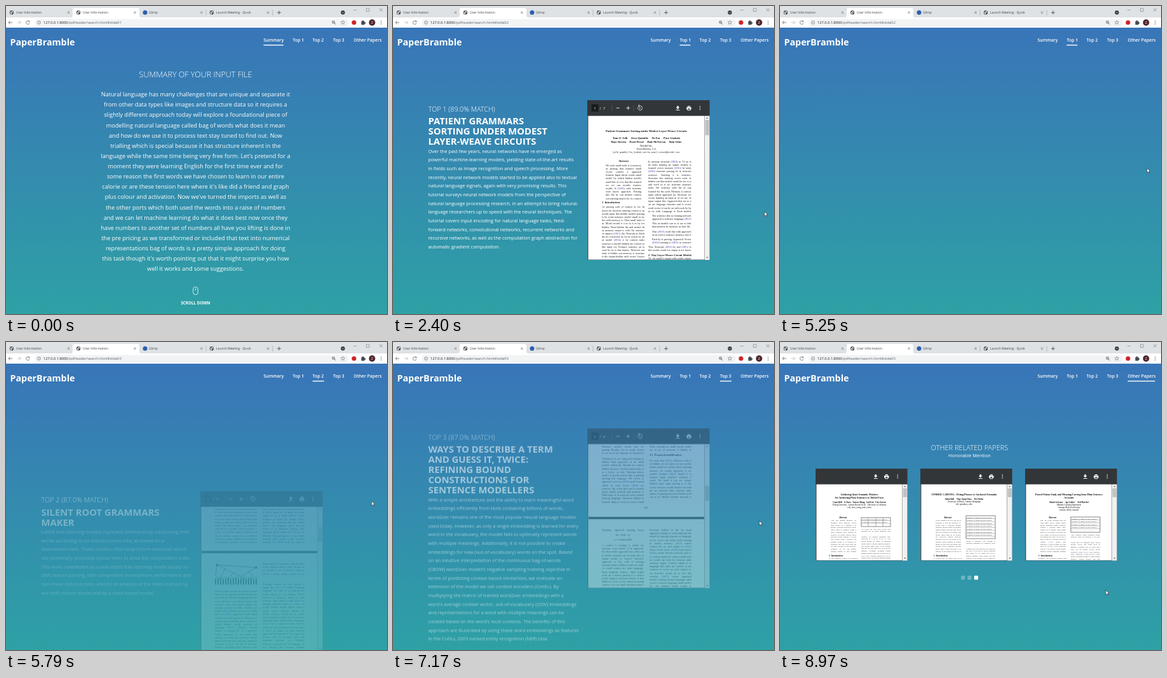
An HTML page for the animation above (9000 ms loop, 600x484 px).

```html
<!DOCTYPE html>
<html lang="en">
<head>
<meta charset="utf-8">
<title>User Information</title>
<style>
html, body { margin: 0; width: 100%; height: 100%; overflow: hidden; }
svg { display: block; width: 100%; height: 100%; font-family: "Open Sans", "Noto Sans", sans-serif; }
.light { font-weight: 300; }
.semi { font-weight: 600; }
.bold { font-weight: 700; }
.mid { text-anchor: middle; }
.serif { font-family: "Liberation Serif", serif; }
.mono { font-family: "Liberation Mono", monospace; }
.col { font-family: "Liberation Serif", serif; color: #222; text-align: justify; overflow: hidden; height: 100%; }
.col i { font-style: normal; color: #33a; }
</style>
</head>
<body>
<svg id="stage" viewBox="0 0 600 484"></svg>
<script>
const LOOP = 9000, LEAVE = 330, RISE = 450;
const stage = document.getElementById('stage');
const clamp = v => Math.max(0, Math.min(1, v));
const smooth = p => p * p * (3 - 2 * p);

const text = (x, y, size, str, cls = '', fill = '#fff') =>
  `<text x="${x}" y="${y}" font-size="${size}" class="${cls}" fill="${fill}">${str}</text>`;
const rect = (x, y, w, h, fill, more = '') =>
  `<rect x="${x}" y="${y}" width="${w}" height="${h}" fill="${fill}" ${more}/>`;
const dot = (x, y, r, fill) => `<circle cx="${x}" cy="${y}" r="${r}" fill="${fill}"/>`;
const line = (d, color, w = 0.8) => `<path d="${d}" fill="none" stroke="${color}" stroke-width="${w}"/>`;
const lines = (x, y, step, size, rows, cls) =>
  rows.map((row, i) => text(x, y + i * step, size, row, cls)).join('');
// fade: how much faster than its slide a part vanishes
const part = (delay, span, lift, body, fade = 0) =>
  `<g class="part" data-delay="${delay}" data-span="${span}" data-lift="${lift}" data-fade="${fade}">${body}</g>`;

// Filler prose for the small paper pages
let seed = 7;
const rnd = () => (seed = (seed * 16807) % 2147483647) / 2147483647;
const vocab = ('we the a of in to and for with each model models word words network small input features sentence ' +
  'training vector language results approach which tasks context that are is on structure memory is can be ' +
  'layers as it an by this learned parsing hidden output matrix').split(' ');
function prose(count) {
  let out = '', start = true;
  for (let i = 0; i < count; i++) {
    const w = vocab[Math.floor(rnd() * vocab.length)];
    out += start ? w[0].toUpperCase() + w.slice(1) : w;
    start = rnd() < 0.07;
    if (rnd() < 0.025) out += ' <i>(20' + (10 + Math.floor(rnd() * 7)) + ')</i>';
    out += start ? '. ' : ' ';
  }
  return out;
}
function column(x, y, w, h, size = 4.1, step = 5.2) {
  const count = Math.ceil(h / step) * Math.ceil(w / size / 2);
  return `<foreignObject x="${x}" y="${y}" width="${w}" height="${h}">` +
    `<div class="col" style="font-size:${size}px;line-height:${step}px">${prose(count)}</div></foreignObject>`;
}

// Browser window
function globe(x, y) {
  return dot(x, y, 3.2, '#4d5156') +
    `<path d="M${x - 2.4} ${y - 0.8}l1.8.3 1 1.2-1 1.9-1.2-1zM${x} ${y - 2.6}l1.8.8.6 1.8-1.7-.2-1.2-1z" fill="#e4e6e9"/>`;
}
const cross = (x, y, r, c) => line(`M${x - r} ${y - r}l${2 * r} ${2 * r}m0 ${-2 * r}l${-2 * r} ${2 * r}`, c, 0.7);

function chrome() {
  const grey = '#5f6368', ink = '#3c4043';
  const tab = (x, name, icon) => icon + text(x, 12.2, 5, name, '', '#45494d');
  return rect(0, 0, 600, 19, '#dfe2e4') + rect(0, 18, 600, 16, '#fff') +
    '<path d="M102 18q3 0 3-3V6q0-3 3-3h99q3 0 3 3v9q0 3 3 3z" fill="#fff"/>' +
    tab(16, 'User Information', globe(9, 10.3)) + tab(121, 'User Information', globe(114, 10.3)) +
    tab(225, 'Glimp', dot(219, 10.3, 3.5, '#2b5fae')) + tab(331, 'Launch Meeting - Quob', globe(324, 10.3)) +
    [98.5, 203, 308, 412.5].map(x => cross(x, 10.3, 1.8, grey)).join('') +
    line('M315 6v9M420 6v9', '#9a9ea4', 0.6) + line('M427 10.3h6m-3-3v6', ink) +
    dot(530.5, 10.3, 3.2, '#3c4043') + line('M529.2 9.7l1.3 1.3 1.3-1.3', '#fff', 0.6) +
    line('M547 6.5h5', '#777', 0.6) + line('M567.5 3.7h4.6v4.6h-4.6z', '#777', 0.6) + cross(590.5, 6, 2.3, '#777') +
    line('M10 26H4m2.6-2.7L3.9 26l2.7 2.7', grey) + line('M17.5 26h6m-2.6-2.7l2.7 2.7-2.7 2.7', '#b5b8bc') +
    line('M36.8 24.6a2.8 2.8 0 1 0 .1 2.5m0-4v1.8h-1.9', grey) +
    rect(45, 20.5, 495, 11.4, '#f1f3f4', 'rx="5.7"') +
    `<circle cx="52" cy="26" r="2.5" fill="none" stroke="${grey}" stroke-width=".6"/>` + line('M52 25.6v1.8M52 24.3v.6', grey, 0.6) +
    `<text x="59" y="28.1" font-size="5.7" fill="#202124">127.0.0.1:8000<tspan fill="#5f6368">/pdfreader/search.html#slide0</tspan><tspan id="hash" fill="#5f6368"></tspan></text>` +
    `<circle cx="515.7" cy="25.4" r="2" fill="none" stroke="${ink}" stroke-width=".7"/>` +
    line('M517.2 27l2 2M514.8 25.4h1.8', ink, 0.8) +
    line('M530.5 22.8l.9 2 2.2.2-1.7 1.5.5 2.1-1.9-1.1-1.9 1.1.5-2.1-1.7-1.5 2.2-.2z', grey, 0.6) +
    dot(548, 26, 3.6, '#d2232a') +
    '<path d="M559.5 24h1.6a1.1 1.1 0 1 1 2 0h1.6v1.8a1.1 1.1 0 1 1 0 2v1.7h-5.2z" fill="#45494d"/>' +
    dot(576.5, 26, 5, '#4e262b') + text(576.5, 28, 5.2, 'Z', 'mid') +
    [23.6, 26, 28.4].map(y => dot(590.8, y, 0.7, grey)).join('');
}

const NAV = [[405.5, 31.5, 'Summary'], [451.5, 17, 'Top 1'], [482.8, 18, 'Top 2'], [515, 18, 'Top 3'], [547.5, 43, 'Other Papers']];
const nav = () => text(6.5, 61.8, 14.3, 'PaperBramble', 'bold') +
  NAV.map(([x, , name]) => text(x, 56.4, 6.9, name, 'semi')).join('') +
  rect(0, 60.8, 0, 1.4, '#fff', 'id="mark"');

// PDF viewer frame
function viewer(x, y, w, h, icons, thumb, page) {
  const mid = y + 12.3, c = '#f1f1f1', right = x + w;
  const [dl, pr, more] = icons;
  return rect(x, y, w, h, '#525659') + rect(x, y, w, 24.7, '#323639') +
    rect(x + 1.5, y + 24.7, w - 9.5, h - 25.2, '#fff') + rect(right - 7.5, y + 24.7, 7.5, h - 24.7, '#f1f1f1') +
    rect(right - 6.8, y + thumb, 6, 24 * h / 251, '#c1c1c1') +
    `<path d="M${right - 5.3} ${y + 28.8}h3l-1.5-1.8zM${right - 5.3} ${y + h - 4.5}h3l-1.5 1.8z" fill="#555"/>` +
    `<path d="M${dl - 1.2} ${mid - 3.4}h2.4v2.4h1.8l-3 3-3-3h1.8zM${dl - 3} ${mid + 2.6}h6v1.1h-6z" fill="${c}"/>` +
    `<path d="M${pr - 2.2} ${mid - 3.3}h4.4v1.6h-4.4zM${pr - 3.7} ${mid - 1.2}h7.4v3.6h-1.4v1.5h-4.6v-1.5h-1.4z" fill="${c}"/>` +
    rect(pr - 1.4, mid + 0.9, 2.8, 2.1, '#323639') +
    [-2.5, 0, 2.5].map(d => dot(more, mid + d, 0.8, c)).join('') + page;
}
function bigViewer(page, pages, thumb, body) {
  const c = '#f1f1f1';
  return viewer(306, 148, 192.5, 251, [448.5, 466, 483.5], thumb, body) +
    rect(312.5, 154.5, 11, 11.3, '#191b1c') + text(318, 162.6, 6, page, 'mid', c) +
    text(325.5, 162.6, 6, '/&#160; ' + pages, '', c) +
    line('M345 155v10.5M379 155v10.5', '#666a6d', 0.6) + line('M351.5 160.3h5M367.3 160.3h6m-3-3v6', c, 0.9) +
    line('M384.8 160.5l2.4-2.4 2.4 2.4-2.4 2.4zM386.6 156.7h2.2a3.7 3.7 0 0 1 0 7.4h-1M388.2 154.9l-1.8 1.8 1.8 1.8', c, 0.8);
}
const black = (x, y, s, str, cls = 'mid serif') => text(x, y, s, str, cls, '#111');

function frontPage() {
  const head = 'mid serif bold';
  return black(399, 197.6, 4.7, 'Patient Grammars Sorting under Modest Layer-Weave Circuits', head) +
    black(399, 209.3, 4.4, 'Tam O. Velk &#160; &#160; Orra Quimble &#160; &#160; Yu Fen &#160; &#160; Pavo Lindrak', head) +
    black(399, 215, 4.4, 'Ilmo Sterrin &#160; &#160; Dorit Wexel &#160; &#160; Hale McTorven &#160; &#160; Brin Osko', head) +
    black(399, 220.5, 4.4, 'Nordal Inc.') + black(399, 226, 4.4, 'Fern Hollow, CA') +
    black(399, 231.3, 3, '{velk,quimble,fen,lindrak,sterrin,wexel,torven}@nordal.test', 'mid mono') +
    black(363, 244.5, 4.3, 'Abstract', head) + column(335, 247.5, 56, 57.2) +
    black(329, 309.7, 4.4, '1 &#160;Introduction', 'serif bold') + column(329, 313.3, 67, 84) +
    column(402, 241.7, 67.5, 83.2) + column(408, 326.5, 61.5, 10.4) + column(408, 339, 61.5, 10.4) +
    column(408, 351.5, 61.5, 10.4) + column(408, 363.5, 61.5, 10.4) + column(402, 375.5, 67.5, 10.4) +
    black(402, 392.6, 4.4, '2 &#160;Tiny Layer-Weave Circuit Models', 'serif bold') + column(402, 394, 67.5, 5);
}
function treePage() {
  let leaves = '';
  for (let i = 0; i < 17; i++) {
    const x = 330 + i * 4;
    leaves += line(`M${x} 295V${286 - i % 3}`, '#222', 1.6) + line(`M${x} 285l2-3 2 3`, '#444', 0.4);
  }
  return column(329, 174, 66, 57) + column(404, 174, 66, 57) + rect(308, 242, 182, 3.5, '#323639') +
    line('M332 264l62 4M332 264l38 18 24-14M332 264l-2 18M345 270l-6 12M358 276l-5 6M382 275l8 7', '#222', 0.6) +
    dot(332, 264, 1.6, '#333') + dot(394, 268, 1.6, '#333') +
    leaves + column(329, 303, 66, 95) + column(404, 260, 66, 20) + column(404, 292, 66, 106);
}
function matrixPage() {
  return column(329, 174, 66, 16) + column(329, 193, 66, 73) + column(404, 174, 66, 10.4) +
    black(404, 191, 4.4, '3.2 &#160;Proposed modification', 'serif bold') + column(404, 196, 66, 62) +
    black(398, 274, 3.6, '3162') + rect(308, 287, 182, 3.5, '#323639') +
    column(329, 305, 66, 6) + black(362, 317, 4.5, 'H = WX + b') + black(362, 324, 4.5, 'y = softmax(H)') +
    column(329, 329, 66, 68) + column(404, 305, 66, 92);
}

function card(i, heads, people, places) {
  const x = 56 + i * 165, c = x + 69, left = x + 21, right = x + 72, bold = 'mid serif bold';
  let y = 241.3, out = '';
  for (const h of heads) { out += black(c, y, 3.9, h, bold); y += 5; }
  y += 2;
  out += black(c, y, 3.2, people, bold);
  for (const p of places) out += black(c, y += 4, 3.1, p);
  out += black(left + 22, 277, 3.4, 'Abstract', bold) + column(left + 3, 279, 40, 51, 2.9, 3.75);
  out += black(left, 337, 3.4, '1 &#160;Introduction', 'serif bold') + column(left, 338.5, 45, 4.5, 2.9, 3.75);
  const top = [276, 273, 275][i], deep = [14, 36, 24][i];
  out += rect(right, top, 46, deep, '#fff', 'stroke="#333" stroke-width=".6"');
  for (let r = top + 4.6; r < top + deep - 1; r += 4.6)
    out += line(`M${right} ${r}h46`, '#666', 0.4) + text(right + 1.5, r - 1, 2.8, 'Example of input text and symbols', 'serif', '#222');
  if (i == 0) out += line(`M${right + 11} ${top}v14m12 -14v14m11 -14v14`, '#444', 0.4);
  const low = top + deep + 2.5;
  out += column(right, low, 46, 8, 2.9, 3.75) + column(right, low + 12, 46, 343 - low - 12, 2.9, 3.75);
  return part(60 + i * 140, 400, 13,
    viewer(x, 199, 144.5, 144.5, [x + 94.7, x + 111.8, x + 129.3], 31, out));
}

// Slides
const summary = ['Natural language has many challenges that are unique and separate it',
  'from other data types like images and structure data so it requires a',
  'slightly different approach today will explore a foundational piece of',
  'modelling natural language called bag of words what does it mean',
  'and how do we use it to process text stay tuned to find out. Now',
  'trialling which is special because it has structure inherent in the',
  "language while the same time being very free form. Let's pretend for a",
  'moment they were learning English for the first time ever and for',
  'some reason the first words we have chosen to learn in our entire',
  "calorie or are these tension here where it's like did a friend and graph",
  "plus colour and activation. Now we've turned the imports as well as",
  'the other ports which both used the words into a raise of numbers',
  'and we can let machine learning do what it does best now once they',
  'have numbers to another set of numbers all have you lifting is done in',
  'the pre pricing as we transformed or included that text into numerical',
  'representations bag of words is a pretty simple approach for doing',
  "this task though it's worth pointing out that it might surprise you how",
  'well it works and some suggestions.'];

const first = () => part(0, 200, 0,
  text(298.5, 111.7, 12.5, 'SUMMARY OF YOUR INPUT FILE', 'light mid') +
  lines(298.5, 142.2, 16.12, 9.13, summary, 'mid') +
  '<rect x="294.7" y="441.5" width="7.6" height="12" rx="3.6" fill="none" stroke="#fff" stroke-width=".8"/>' +
  line('M298.5 444v3', '#fff', 0.9) + text(298.5, 469.2, 6.3, 'SCROLL DOWN', 'bold mid'));

function match(heading, title, body, pdf) {
  return part(50, 200, 0, text(55.5, 166, 10.8, heading, 'light')) +
    part(85, 200, 0, lines(55.5, 186.3, 16, 14.8, title, 'bold')) +
    part(105, 200, 0, lines(55.5, 182.7 + 16 * title.length, 13.66, 7.38, body)) +
    part(120, 200, 0, pdf, 2);
}

const others = () => part(0, 250, 15,
    text(298.5, 170.2, 11.05, 'OTHER RELATED PAPERS', 'light mid') +
    text(298.5, 180.7, 7.35, 'Honorable Mention', 'mid')) +
  card(0, ['Gathering Quiet Semantic Markers', 'for Anchoring Plain Sentences to Tabled Facts'],
    'Guan Relli &#160; Jo Tavix &#160; Yarrow Mung &#160; Lin Pesk &#160; Chet Zorrin',
    ['Peking University &#160; Lumora Research Lab &#160; University of California', 'relli, tavix, mung, pesk, zorrin']) +
  card(1, ['SYMBOL CARVING : Fitting Phrases to Anchored Formulas'], 'Subin Rall &#160; &#160; Shay Upton-Dare &#160; &#160; Dov Rothe',
    ['University of Illinois, Urbana-Champaign', 'rall, uptondare, rothe']) +
  card(2, ['Paired Notion Study and Meaning Carving from Plain Sentence', 'Accounts'], 'Shanti Scrivane &#160; &#160; Igo Labbet &#160; &#160; Tod Marchel',
    ['Machine Learning Department', 'Carnegie Mellon University', 'scrivane, labbet, marchel']) +
  part(0, 150, 0, [285, 295.3, 305.8].map((x, i) => rect(x, 367.3, 6.2, 6.2, '#fff', `rx="1.2" opacity="${i < 2 ? 0.3 : 1}"`)).join(''));

const slides = [
  { enter: -1000, leave: 660, body: first() },
  { enter: 1110, leave: 4980, body: match('TOP 1 (89.0% MATCH)',
    ['PATIENT GRAMMARS', 'SORTING UNDER MODEST', 'LAYER-WEAVE CIRCUITS'],
    ['Over the past few years, neural networks have re-emerged as',
      'powerful machine-learning models, yielding state-of-the-art results',
      'in fields such as image recognition and speech processing. More',
      'recently, neural network models started to be applied also to textual',
      'natural language signals, again with very promising results. This',
      'tutorial surveys neural network models from the perspective of',
      'natural language processing research, in an attempt to bring natural-',
      'language researchers up to speed with the neural techniques. The',
      'tutorial covers input encoding for natural language tasks, feed-',
      'forward networks, convolutional networks, recurrent networks and',
      'recursive networks, as well as the computation graph abstraction for',
      'automatic gradient computation.'], bigViewer(1, 7, 31, frontPage())) },
  { enter: 5640, leave: 6030, body: match('TOP 2 (87.0% MATCH)',
    ['SILENT ROOT GRAMMARS', 'MAKER'],
    ['Latent tree learning models represent sentences by composing their',
      'words according to an induced parse tree, all based on a',
      'downstream task. These models often outperform baselines which',
      'use (externally provided) syntax trees to drive the composition order.',
      'This work contributes (a) a new latent tree learning model based on',
      'shift-reduce parsing, with competitive downstream performance and',
      'non-trivial induced trees, and (b) an analysis of the trees learned by',
      'our shift-reduce model and by a chart-based model.'], bigViewer(2, 7, 56, treePage())) },
  { enter: 6540, leave: 7110, body: match('TOP 3 (87.0% MATCH)',
    ['WAYS TO DESCRIBE A TERM', 'AND GUESS IT, TWICE:', 'REFINING BOUND', 'CONSTRUCTIONS FOR', 'SENTENCE MODELLERS'],
    ['With a simple architecture and the ability to learn meaningful word',
      'embeddings efficiently from texts containing billions of words,',
      'word2vec remains one of the most popular neural language models',
      'used today. However, as only a single embedding is learned for every',
      'word in the vocabulary, the model fails to optimally represent words',
      'with multiple meanings. Additionally, it is not possible to create',
      'embeddings for new (out-of-vocabulary) words on the spot. Based',
      'on an intuitive interpretation of the continuous bag-of-words',
      "(CBOW) word2vec model's negative sampling training objective in",
      'terms of predicting context based similarities, we motivate an',
      'extension of the model we call context encoders (ConEc). By',
      'multiplying the matrix of trained word2vec embeddings with a',
      "word's average context vector, out-of-vocabulary (OOV) embeddings",
      'and representations for a word with multiple meanings can be',
      "created based on the word's local contexts. The benefits of this",
      'approach are illustrated by using these word embeddings as features',
      'in the CoNLL 2003 named entity recognition (NER) task.'], bigViewer(2, 6, 90, matrixPage())) },
  { enter: 7620, leave: LOOP, still: true, body: others() }
];

stage.innerHTML = '<defs><linearGradient id="sky" x2="0" y2="1"><stop stop-color="#3975b8"/><stop offset="1" stop-color="#2ea1a5"/></linearGradient></defs>' +
  rect(0, 33, 600, 451, 'url(#sky)') + slides.map(s => `<g class="slide">${s.body}</g>`).join('') + nav() + chrome() +
  '<path id="cursor" d="M0 0V7.2L1.7 5.7 2.8 8 3.9 7.5 2.9 5.3H5.1Z" fill="#fff" stroke="#222" stroke-width=".6"/>';

const find = id => document.getElementById(id);
const hash = find('hash'), mark = find('mark'), cursor = find('cursor');
stage.querySelectorAll('.slide').forEach((el, i) => {
  slides[i].el = el;
  slides[i].parts = [...el.querySelectorAll('.part')].map(p =>
    ({ el: p, delay: +p.dataset.delay, span: +p.dataset.span, lift: +p.dataset.lift, fade: +p.dataset.fade }));
});

const PATH = [[240, 597, 36], [330, 540, 170], [420, 584, 333], [480, 584, 326], [2370, 584, 326], [2400, 585, 323],
  [2700, 586.5, 319], [4860, 586.5, 319], [5400, 576, 240], [5790, 575.7, 250], [6360, 577, 281], [7170, 577, 281],
  [7860, 576.5, 275], [8200, 560, 298], [8550, 516, 350], [8970, 513, 390]];

function pointer(t) {
  const i = PATH.findIndex(k => k[0] > t);
  if (i < 0) return PATH[PATH.length - 1].slice(1);
  const a = PATH[Math.max(0, i - 1)], b = PATH[i];
  const p = b === a ? 0 : smooth((t - a[0]) / (b[0] - a[0]));
  return [a[1] + (b[1] - a[1]) * p, a[2] + (b[2] - a[2]) * p];
}

function drawSlide(s, t) {
  const shown = t >= s.enter && t < s.leave + LEAVE;
  s.el.setAttribute('display', shown ? 'inline' : 'none');
  if (!shown) return;
  const out = clamp((t - s.leave) / LEAVE), rise = s.still ? 0 : 117 * (1 - smooth(clamp((t - s.enter) / RISE)));
  s.el.setAttribute('transform', `translate(0 ${rise - 66 * out})`);
  s.el.setAttribute('opacity', (1 - out) ** 3);
  for (const p of s.parts) {
    const k = clamp((t - s.enter - p.delay) / p.span);
    p.el.setAttribute('opacity', k * (1 - out) ** p.fade);
    p.el.setAttribute('transform', `translate(0 ${p.lift * (1 - k ** 3)})`);
  }
}

function render(t) {
  slides.forEach(s => drawSlide(s, t));
  const now = slides.filter(s => t >= s.enter).length;
  hash.textContent = now;
  mark.setAttribute('x', NAV[now - 1][0]);
  mark.setAttribute('width', NAV[now - 1][1]);
  cursor.setAttribute('display', t < 240 ? 'none' : 'inline');
  cursor.setAttribute('transform', `translate(${pointer(t)})`);
}

const begin = performance.now();
function tick() {
  render((performance.now() - begin) % LOOP);
  requestAnimationFrame(tick);
}
render(0);
requestAnimationFrame(tick);
</script>
</body>
</html>
```
